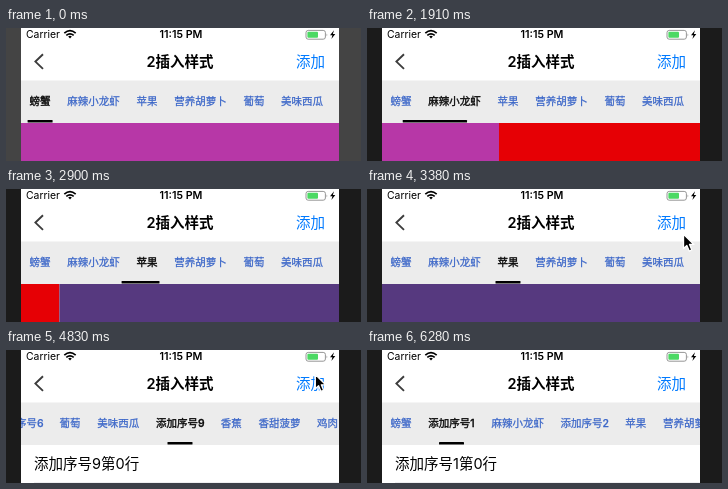
An HTML page that plays this animation: 355x133 px, repeating every 7 s.

```html
<!DOCTYPE html>
<html lang="zh-CN">
<head>
<meta charset="utf-8">
<title>标签栏插入演示</title>
<style>
  html, body { margin: 0; width: 100%; height: 100%; overflow: hidden; background: #fff; }
  svg { display: block; width: 355px; height: 133px; }
  text { font-family: Inter, "Noto Sans CJK SC", "Noto Sans CJK", sans-serif; white-space: pre; }
  .status { font-size: 10.4px; }
  .tab { font-size: 10.5px; font-weight: 500; fill: #3b66c8; stroke: #3b66c8; stroke-width: .25px; }
  .tab.on { fill: #0a0a0a; stroke: #0a0a0a; stroke-width: .35px; }
  .nav { font-size: 14.5px; }
</style>
</head>
<body>
<svg viewBox="0 0 355 133">
  <defs><clipPath id="screen"><rect x="15" width="318" height="133"/></clipPath></defs>
  <rect id="side" width="355" height="133"/>
  <g clip-path="url(#screen)">
    <rect x="15" width="318" height="133" fill="#fff"/>
    <text class="status" x="20" y="10.3">Carrier</text>
    <g fill="none" stroke="#000" stroke-width="1.7">
      <path d="M58.3 5.2Q64 0.2 69.7 5.2M60.3 7.4Q64 4.3 67.7 7.4"/>
      <path d="M62.2 8.5Q64 7 65.8 8.5L64 10.5Z" fill="#000" stroke="none"/>
    </g>
    <text class="status" x="175" y="10.3" text-anchor="middle" font-weight="600" style="font-size:10.7px">11:15 PM</text>
    <rect x="300" y="2.4" width="19.4" height="8.8" rx="2.2" fill="#fff" stroke="#8b8b8b" stroke-width=".9"/>
    <rect x="301.4" y="3.8" width="10.6" height="6" rx="1" fill="#4cd964"/>
    <path d="M320.6 5.4q1.5 1.4 0 2.8z" fill="#8b8b8b"/>
    <path d="M328 2.2L324 7.2H326.4L325.4 11L329.3 5.9H326.9Z"/>
    <path d="M37 26.3L29.4 33.6L37 40.9" fill="none" stroke="#3c3c3c" stroke-width="1.9"/>
    <text class="nav" x="174" y="39.3" text-anchor="middle" font-weight="600">2插入样式</text>
    <text class="nav" id="add" x="290" y="39.3" fill="#007aff">添加</text>
    <g id="pages">
      <rect id="pageA" y="95" width="318" height="38"/>
      <rect id="pageB" y="95" width="318" height="38"/>
    </g>
    <g id="list">
      <text class="nav" id="row" x="28" y="118.8"></text>
      <path d="M28 132.6H333" stroke="#dcdce0" stroke-width=".5"/>
    </g>
    <rect x="15" y="52.5" width="318" height="42.5" fill="#ececec"/>
    <g id="tabs"></g>
    <rect id="line" y="92" height="2.5" rx=".6"/>
    <path id="cursor" d="M0 0V14.2L3.3 11.2L5.7 16.8L8.3 15.7L6 10.2H10.4Z" fill="#000" stroke="#fff" stroke-width="1.3" stroke-linejoin="round"/>
  </g>
</svg>
<script>
const $ = id => document.getElementById(id);
const LOOP = 7000, LEFT = 15, WIDTH = 318, EM = 10.5, GAP = 16.7, BAR = 25;
const foods = ['螃蟹', '麻辣小龙虾', '苹果', '营养胡萝卜', '葡萄', '美味西瓜', '香蕉', '香甜菠萝', '鸡肉', '鱼', '海苔'];
const colors = ['#b737a7', '#e60005', '#56397f'];

// Keys are [time, value, easing of the segment leading here]
const linear = x => x, hold = () => 0, easeOut = x => 1 - (1 - x) ** 2;
const pageKeys = [
  [0, 0], [1500, 0, hold], [1500, .182], [1560, .373, linear], [1860, .373, hold],
  [1860, .45], [2140, 1, easeOut], [2560, 1, hold], [2560, 1.056],
  [2900, 1.878, linear], [3110, 2, easeOut]
];
const cursorXKeys = [[3260, 317.5], [3370, 317.5], [3550, 309.3, easeOut], [6030, 309.3], [6280, 317]];
const cursorYKeys = [[3260, 48], [3370, 48], [3550, 24.6, easeOut], [6030, 24.6], [6280, 136]];
const addKeys = [
  [0, 1], [3730, 1], [3730, .2], [3800, .2], [4140, 1],
  [4600, 1], [4600, .75], [4720, 1],
  [5060, 1], [5060, .85], [5120, 1], [5650, 1], [5650, .75], [5760, 1]
];
const inserts = [[3790, 2], [4380, 5], [4600, 6], [4830, 9], [5060, 7], [5650, 1]];

function track(keys, t) {
  let prev = keys[0];
  for (const key of keys) {
    if (t < key[0]) {
      const x = (t - prev[0]) / (key[0] - prev[0]);
      return prev[1] + (key[1] - prev[1]) * (key[2] || linear)(Math.max(0, x));
    }
    prev = key;
  }
  return prev[1];
}

const charWidth = c => c === '1' ? 4.4 : /\d/.test(c) ? 6 : EM;

function layout(names) {
  let x = 23.6;
  return names.map(name => {
    const w = [...name].reduce((sum, c) => sum + charWidth(c), 0);
    const tab = { name, x, mid: x + w / 2 };
    x += w + GAP;
    return tab;
  });
}

let drawn = '';
function drawTabs(tabs, active, scroll) {
  const key = tabs.length + ':' + active;
  if (key === drawn) return;
  drawn = key;
  $('tabs').innerHTML = tabs.map((tab, i) =>
    `<text class="tab${i === active ? ' on' : ''}" x="${tab.x - scroll}" y="77.4">${tab.name}</text>`).join('');
}

function render(t) {
  const names = foods.slice();
  let added = -1;
  for (const [time, index] of inserts) {
    if (t < time) break;
    names.splice(index, 0, '添加序号' + index);
    added = index;
  }
  const tabs = layout(names);
  const listed = added >= 0;
  const pos = listed ? added : track(pageKeys, t);
  const from = Math.floor(pos), p = pos - from;
  const active = Math.round(pos);
  const scroll = listed ? Math.max(0, tabs[added].mid - LEFT - WIDTH / 2) : 0;
  drawTabs(tabs, active, scroll);

  // The bar's right edge leads in the first half, its left edge follows in the second
  const a = tabs[from].mid, b = tabs[Math.min(from + 1, tabs.length - 1)].mid;
  const lead = a + (b - a) * Math.min(1, p * 2);
  const tail = a + (b - a) * Math.max(0, p * 2 - 1);
  $('line').setAttribute('x', tail - BAR / 2 - scroll);
  $('line').setAttribute('width', lead - tail + BAR);

  $('pages').style.display = listed ? 'none' : '';
  $('list').style.display = listed ? '' : 'none';
  if (listed) {
    $('row').textContent = `添加序号${added}第0行`;
  } else {
    const edge = LEFT - p * WIDTH;
    $('pageA').setAttribute('x', edge);
    $('pageA').setAttribute('fill', colors[from]);
    $('pageB').setAttribute('x', edge + WIDTH);
    $('pageB').setAttribute('fill', colors[Math.min(from + 1, 2)]);
  }

  $('side').setAttribute('fill', t < 1500 ? '#444' : '#1b1b1b');
  $('add').setAttribute('opacity', track(addKeys, t));
  $('cursor').style.display = t >= 3260 && t < 6280 ? '' : 'none';
  $('cursor').setAttribute('transform', `translate(${track(cursorXKeys, t)} ${track(cursorYKeys, t)})`);
}

const start = performance.now();
function frame() {
  render((performance.now() - start) % LOOP);
  requestAnimationFrame(frame);
}
frame();
</script>
</body>
</html>
```
